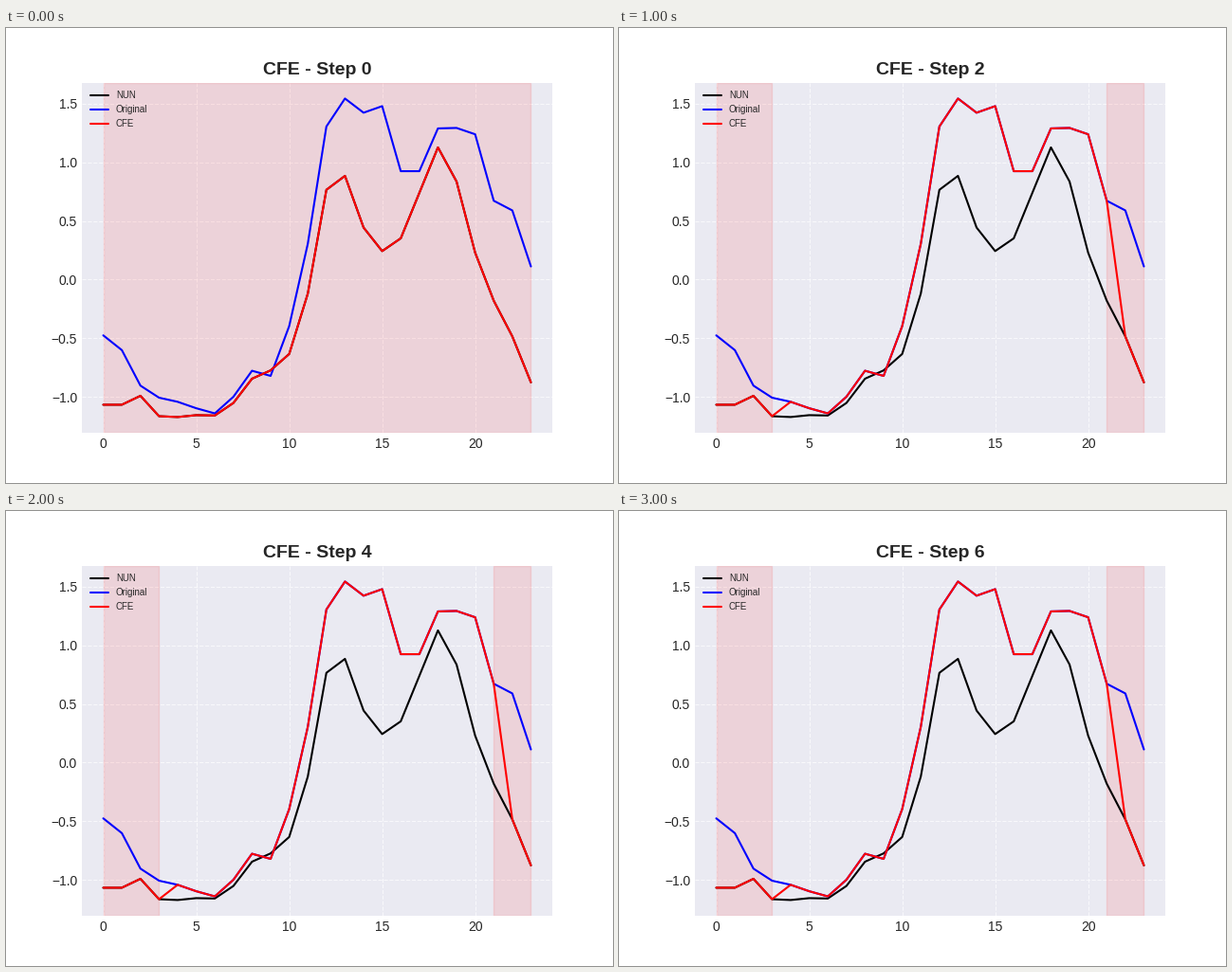
Animation, 640 px wide and 480 px high, one loop 3.5 s. Source, as a matplotlib script:

```python
import matplotlib.pyplot as plt
import numpy as np
from matplotlib.animation import FuncAnimation

INK = "0.15"
plt.rcParams.update({
    "font.family": "Liberation Sans",
    "text.color": INK,
    "xtick.color": INK,
    "ytick.color": INK,
    "xtick.major.size": 0,
    "ytick.major.size": 0,
    "axes.facecolor": "#EAEAF2",
    "axes.linewidth": 0,
    "axes.edgecolor": "white",
    "axes.axisbelow": True,
    "grid.color": "white",
    "lines.solid_capstyle": "round",
    "legend.frameon": False,
})

STEPS = 7
LAST = 23

original = np.array([
    -0.476, -0.602, -0.905, -1.008, -1.043, -1.098, -1.142, -1.000,
    -0.778, -0.822, -0.397, 0.305, 1.306, 1.545, 1.424, 1.480,
    0.925, 0.925, 1.290, 1.294, 1.240, 0.673, 0.590, 0.112])
neighbour = np.array([
    -1.068, -1.068, -0.992, -1.166, -1.173, -1.157, -1.160, -1.053,
    -0.846, -0.775, -0.635, -0.120, 0.766, 0.885, 0.444, 0.243,
    0.352, 0.740, 1.128, 0.837, 0.230, -0.180, -0.485, -0.877])
t = np.arange(LAST + 1)

fig, ax = plt.subplots(figsize=(6.4, 4.8), dpi=100)
ax.grid(True, linestyle="--", alpha=0.7)
ax.plot(t, neighbour, color="black", label="NUN")
ax.plot(t, original, color="blue", label="Original")
cfe_line, = ax.plot(t, neighbour, color="red", label="CFE")
left_span = ax.axvspan(0, LAST, color="red", alpha=0.1)
right_span = ax.axvspan(20, LAST, color="red", alpha=0.1)
ax.set_xlim(-0.05 * LAST, 1.05 * LAST)
ax.legend(loc="upper left", fontsize=7)
title = ax.set_title("", fontsize=14, fontweight="bold")


def set_span(span, start, end):
    span.set_x(start)
    span.set_width(end - start)


def draw(step):
    title.set_text(f"CFE - Step {step}")
    if step == 0:
        cfe_line.set_ydata(neighbour)
        set_span(left_span, 0, LAST)
        right_span.set_visible(False)
    else:
        # the right segment alternates between two start points
        start = 20 if step % 2 else 21
        replaced = (t <= 3) | (t > start)
        cfe_line.set_ydata(np.where(replaced, neighbour, original))
        set_span(left_span, 0, 3)
        set_span(right_span, start, LAST)
        right_span.set_visible(True)
    return cfe_line, left_span, right_span, title


anim = FuncAnimation(fig, draw, frames=STEPS, interval=500,
                     init_func=lambda: draw(0), repeat=True, blit=False)
plt.show()
```
